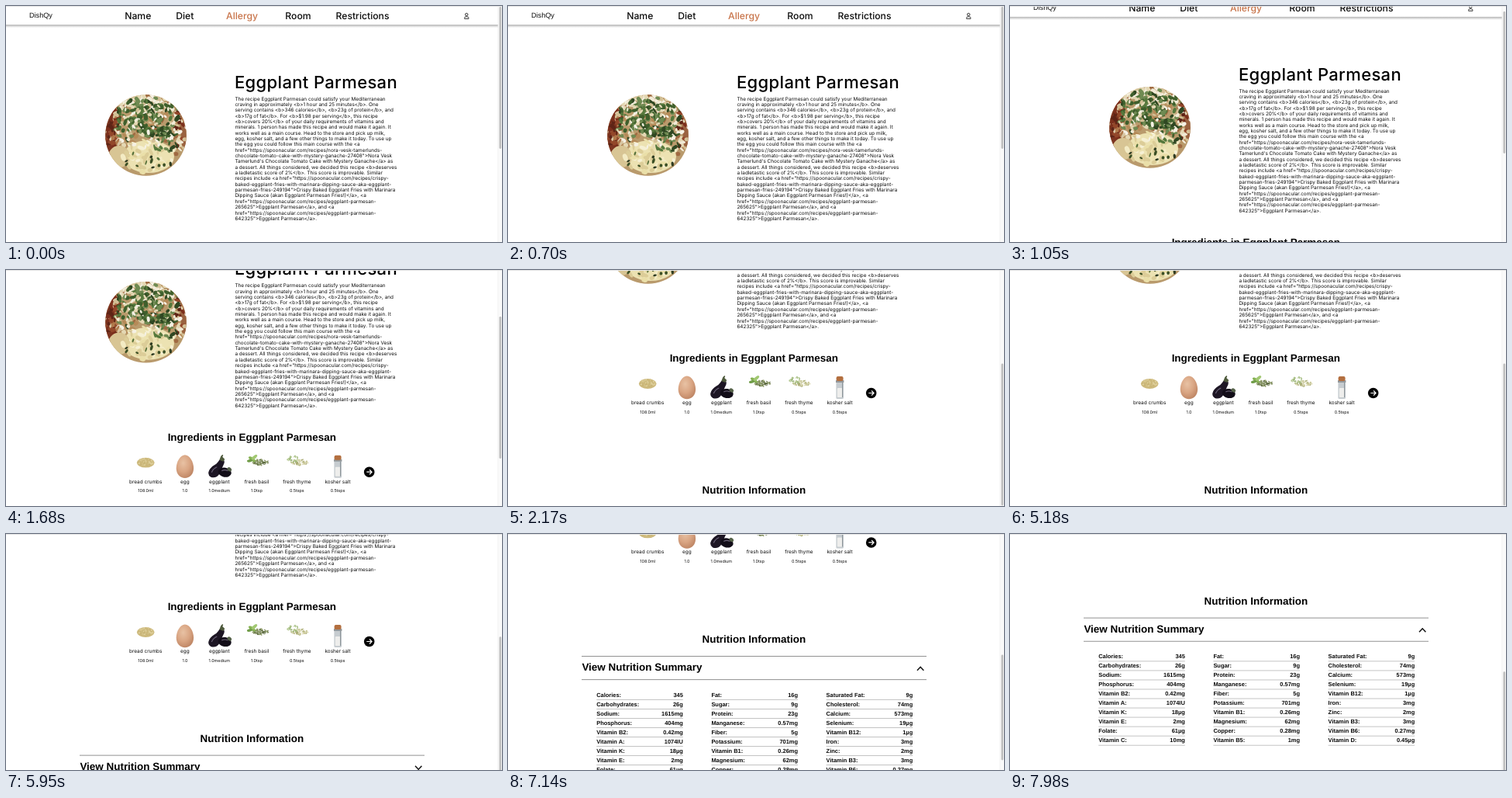
Recreate the animation shown at these times as an HTML page. Size 640 by 304 pixels, loop 8000 ms.

```html
<!DOCTYPE html>
<html lang="en">
<head>
<meta charset="utf-8">
<title>Recipe page</title>
<style>
html, body { margin: 0; width: 100%; height: 100%; overflow: hidden; background: #fff; }
svg { display: block; width: 640px; height: 304px; text-rendering: geometricPrecision; }
text { font-family: Inter, "Open Sans", sans-serif; fill: #0c0c0c; }
.title { font-size: 22px; font-weight: 500; letter-spacing: .35px; fill: #000; }
.nav { font-size: 12.2px; font-weight: 500; }
.bold { font: bold 13.45px "Liberation Sans", Arial, sans-serif; fill: #000; }
.cell { font: bold 7.45px "Liberation Sans", Arial, sans-serif; }
.logo { font: 9.1px "Liberation Sans", Arial, sans-serif; }
.mid { text-anchor: middle; }
.end { text-anchor: end; }
</style>
</head>
<body>
<svg id="stage" viewBox="0 0 640 304"></svg>
<script>
const LOOP = 8000;

let seed = 7;
const rnd = () => (seed = (seed * 16807) % 2147483647) / 2147483647;
const pick = list => list[Math.floor(rnd() * list.length)];
const range = (n, fn) => Array.from({ length: n }, (_, i) => fn(i)).join('');

const esc = s => s.replace(/&/g, '&amp;').replace(/</g, '&lt;');
const text = (x, y, s, cls = '', size = '', fill = '') =>
  `<text x="${x}" y="${y}" class="${cls}" style="${size && `font-size:${size}px;`}${fill && `fill:${fill}`}">${esc(s)}</text>`;
const oval = (x, y, rx, ry, fill, turn = 0) =>
  `<ellipse cx="${x}" cy="${y}" rx="${rx}" ry="${ry}" fill="${fill}" transform="rotate(${turn} ${x} ${y})"/>`;
const box = (x, y, w, h, fill, r = 0) =>
  `<rect x="${x}" y="${y}" width="${w}" height="${h}" rx="${r}" fill="${fill}"/>`;
const path = (d, fill, stroke = 'none', width = 1) =>
  `<path d="${d}" fill="${fill}" stroke="${stroke}" stroke-width="${width}"/>`;
const rule = (x, y, w, color) => box(x, y, w, 0.8, color);

// Small ovals scattered inside an ellipse
const scatter = (n, x, y, rx, ry, size, colors) => range(n, () => {
  const a = rnd() * 6.283, r = Math.sqrt(rnd());
  return oval(x + rx * r * Math.cos(a), y + ry * r * Math.sin(a),
    size * (0.6 + rnd() * 0.6), size * (0.3 + rnd() * 0.4), pick(colors), rnd() * 180);
});

const shades = `<defs><radialGradient id="shell" cx=".4" cy=".35" r=".7">
  <stop offset="0" stop-color="#e8c2a4"/><stop offset=".55" stop-color="#d9a583"/><stop offset="1" stop-color="#bd8463"/>
</radialGradient><linearGradient id="shadow" x2="0" y2="1">
  <stop offset="0" stop-color="#b4b4b4"/><stop offset="1" stop-color="#fff"/>
</linearGradient><clipPath id="plate"><circle cx="180.5" cy="166.5" r="52.3"/></clipPath></defs>`;

const header = () => {
  const nav = [['Name', 170.3], ['Diet', 230.8], ['Allergy', 304.5], ['Room', 377], ['Restrictions', 460]];
  return box(0, 24, 635, 4, 'url(#shadow)') +
    text(30, 15.4, 'DishQy', 'logo') +
    nav.map(([s, x]) => text(x, 17.1, s, 'nav mid', '', s === 'Allergy' ? '#c8744a' : '')).join('') +
    '<circle cx="594.3" cy="11" r="1.7" fill="none" stroke="#222" stroke-width=".9"/>' +
    path('M591.6 16.4v-.8q0-1.8 1.8-1.8h1.8q1.8 0 1.8 1.8v.8z', 'none', '#222', 0.9);
};

const dish = () => {
  const greens = ['#3f5f2c', '#56783c', '#2f4722', '#6f8a52'];
  const creams = ['#f1ead6', '#e4d8b4', '#f5f1e4', '#d3c096'];
  const crust = ['#7c2f1c', '#93472a', '#5e2416', '#b07a4c'];
  return '<g clip-path="url(#plate)">' + box(128, 114, 106, 106, '#b99a6c') +
    scatter(240, 181, 160, 52, 50, 4.5, [...creams, '#b58a58', '#a06a42']) +
    oval(133, 160, 10, 36, '#7c3420', 6) + oval(231, 158, 6, 30, '#9a6240', -4) +
    scatter(70, 139, 158, 9, 34, 4, [...crust, '#d8c6a2']) + scatter(30, 226, 158, 7, 34, 3.6, [...crust, ...creams]) +
    scatter(60, 176, 126, 38, 11, 4.2, creams) +
    oval(184, 194, 33, 21, '#ece2b2') + oval(146, 194, 14, 14, '#d8c594', 40) +
    scatter(50, 182, 194, 34, 22, 4.5, ['#f3ebc4', '#eadfa8', '#f6f0d4', '#dccd98']) +
    scatter(95, 188, 142, 36, 26, 4.2, greens) +
    scatter(40, 160, 150, 20, 28, 3.6, greens) + scatter(34, 206, 170, 20, 18, 3.8, greens) +
    scatter(50, 180, 150, 42, 32, 3, creams) +
    scatter(12, 182, 200, 36, 14, 3, ['#3b4f25', '#2f3c22', '#56703a']) + '</g>';
};

const summary = `The recipe Eggplant Parmesan could satisfy your Mediterranean
craving in approximately <b>1 hour and 25 minutes</b>. One
serving contains <b>346 calories</b>, <b>23g of protein</b>, and
<b>17g of fat</b>. For <b>$1.98 per serving</b>, this recipe
<b>covers 20%</b> of your daily requirements of vitamins and
minerals. 1 person has made this recipe and would make it again. It
works well as a main course. Head to the store and pick up milk,
egg, kosher salt, and a few other things to make it today. To use up
the egg you could follow this main course with the <a
href="https://spoonacular.com/recipes/nora-vesk-tamerlunds-
chocolate-tomato-cake-with-mystery-ganache-27408">Nora Vesk
Tamerlund's Chocolate Tomato Cake with Mystery Ganache</a> as
a dessert. All things considered, we decided this recipe <b>deserves
a ladletastic score of 2%</b>. This score is improvable. Similar
recipes include <a href="https://spoonacular.com/recipes/crispy-
baked-eggplant-fries-with-marinara-dipping-sauce-aka-eggplant-
parmesan-fries-249194">Crispy Baked Eggplant Fries with Marinara
Dipping Sauce (akan Eggplant Parmesan Fries!)</a>, <a
href="https://spoonacular.com/recipes/eggplant-parmesan-
265625">Eggplant Parmesan</a>, and <a
href="https://spoonacular.com/recipes/eggplant-parmesan-
642325">Eggplant Parmesan</a>.`;

const herbs = ['#6b7a48', '#93a06c', '#4f5d36'];
const grains = ['#d9c88f', '#c6b274', '#e4d7a8'];
const cheese = ['#f0dfae', '#e6cc8c', '#f6ecca'];

// Each item: name, amount, centre x, picture
const pages = [[
  ['bread crumbs', '108.0ml', 180.2, x => oval(x, 347.5, 11.3, 6.4, '#cdb97c') + scatter(60, x, 346.5, 10, 5, 1.1, grains)],
  ['egg', '1.0', 230.9, x =>
    path(`M${x} 337.5c6 0 11.2 9 11.2 17 0 8-5 12.700-11.2 12.700s-11.2-4.700-11.2-12.700c0-8 5.200-17 11.2-17z`, 'url(#shell)')],
  ['eggplant', '1.0medium', 275.3, x =>
    path(`M${x + 5} 343q3 3 0 8l-5 11q-4 6-11 4-5-3-2-9 3-5 9-8 3-3 4-5z`, '#1d1624') +
    oval(x + 7, 360, 8.5, 6, '#120d18', 10) + path(`M${x - 10} 360q2-5 7-7`, 'none', '#6b6278', 1.2) +
    path(`M${x + 3} 358q4-2 8 0`, 'none', '#6b6278', 1.2) +
    path(`M${x} 344l2-5 2-2 1 1-1 2 3 3-2 3z`, '#4e5a3c') + oval(x + 13, 356, 3, 2.4, '#56634a', 40)],
  ['fresh basil', '1.0tsp', 323.5, x => scatter(70, x + 5, 347, 10, 4, 1.3, herbs) +
    oval(x - 6, 343, 5.4, 2.2, '#86b254', 35) + oval(x - 3, 340.5, 4.5, 2, '#a2c873', -40) + oval(x - 9, 345, 3.6, 1.8, '#709c48', -10)],
  ['fresh thyme', '0.5tsps', 375.4, x => scatter(70, x + 3, 347, 11, 3.6, 1.3, ['#c9c795', '#a9ab73', '#dcd9b4']) +
    scatter(24, x - 5, 343, 8, 4, 1.5, ['#93b070', '#b9cc98'])],
  ['kosher salt', '0.5tsps', 428, x => box(x - 4.6, 345, 9.6, 22, '#c6ccd0', 1.5) + box(x - 3.2, 353, 6.8, 12, '#eeeeec', 1) +
    box(x - 5, 343, 10.4, 3, '#94999c') + box(x - 4.4, 338, 9, 6, '#b36f3f', 2) + box(x + 3, 346, 1.2, 19, '#8f979c')]
], [
  ['milk', '1.0Tbsp', 127.3, x => path(`M${x - 12.5} 339h25l-3 26q-9 4-19 0z`, '#e6e8ea') +
    path(`M${x - 11} 345h22l-2.6 19q-8 3-16.6 0z`, '#f8f8f6') + oval(x, 339, 12.5, 2.2, '#d9dcde') +
    oval(x, 339.2, 11, 1.5, '#f5f6f6') + oval(x, 345, 11, 2, '#fff') + path(`M${x - 9} 365q9 3 18 0`, 'none', '#c3c7ca')],
  ['fresh oregano', '1.0tsp', 178.3, x => oval(x + 2, 346.5, 10, 3.6, '#7c8a55') + scatter(55, x + 1, 346, 12, 4, 1.2, herbs) +
    oval(x - 9, 343, 4.5, 2.4, '#6f9f4c', 25) + oval(x - 4, 341, 4, 2, '#88b463', -25)],
  ['parmesan cheese', '150.0g', 244, x => path(`M${x - 3} 349l4-7 10 1 1 8-9 3z`, '#e5c98b') + path(`M${x - 3} 349l4-7 10 1-5 5z`, '#f3e1b3') +
    oval(x - 4, 352, 7.5, 3.6, '#eedcae') + scatter(30, x - 3, 352, 9, 3.4, 1.5, cheese)],
  ['italian seasoning mix', '1.5tsps', 320.3, x => `<g transform="rotate(38 ${x + 3} 349)">` +
    box(x - 3, 336, 13, 27, '#cfc9a9', 3) + box(x - 1, 343, 9, 15, '#e6e2cd') + box(x - 3, 335, 13, 5, '#b9b394', 2) + '</g>' +
    scatter(30, x + 4, 349, 6, 7, 1.2, ['#a59a66', '#dcd5b2', '#8a8352']) +
    scatter(45, x - 6, 362, 8, 3.6, 1.2, ['#cdbb7c', '#a9a15e', '#e2d8ac'])],
  ['shredded mozzarella cheese', '224.0g', 412.7, x => path(`M${x - 12.5} 349q3 9 12.5 9.5 9.5-.5 12.5-9.5z`, '#8f4a2b') +
    oval(x, 348, 12.6, 6, '#a4663e') + oval(x, 347.5, 11.5, 5.2, '#eee7cb') +
    scatter(45, x, 347.2, 10, 4, 1.4, ['#f8f4e2', '#e4dab4', '#efe8cf'])],
  ['tomato sauce', '735.0ml', 494.3, x => box(x - 7, 342, 14, 24.5, '#a52419', 3) + box(x - 5.5, 338.5, 11, 4, '#3c3431', 1) +
    box(x - 5, 346, 10, 13, '#bb3526', 1) + box(x + 4.5, 345, 1.5, 19, '#7a160f')]
]];

const arrow = (x, dir) => `<g transform="translate(${x} 359.5) scale(${dir} 1)"><circle r="6.8" fill="#000"/>` +
  path('M-3.4 0H3.2M.4-3L3.4 0 .4 3', 'none', '#fff', 1.2) + '</g>';

const carousel = (items, i) => `<g id="page${i}">` + items.map(([name, amount, x, draw]) =>
  draw(x) + text(x, 374, name, 'mid', 6.45) + text(x, 385.7, amount, 'mid', 5.4)).join('') +
  (i ? arrow(99.8, -1) : arrow(468.7, 1)) + '</g>';

const facts = [
  'Calories 345|Carbohydrates 26g|Sodium 1615mg|Phosphorus 404mg|Vitamin B2 0.42mg|Vitamin A 1074IU|Vitamin K 18µg|Vitamin E 2mg|Folate 61µg|Vitamin C 10mg',
  'Fat 16g|Sugar 9g|Protein 23g|Manganese 0.57mg|Fiber 5g|Potassium 701mg|Vitamin B1 0.26mg|Magnesium 62mg|Copper 0.28mg|Vitamin B5 1mg',
  'Saturated Fat 9g|Cholesterol 74mg|Calcium 573mg|Selenium 19µg|Vitamin B12 1µg|Iron 3mg|Zinc 2mg|Vitamin B3 3mg|Vitamin B6 0.27mg|Vitamin D 0.45µg'
];
const table = () => facts.map((column, c) => column.split('|').map((row, r) => {
  const cut = row.lastIndexOf(' '), x = 114.2 + c * 148.2, y = 558.2 + r * 12.03;
  return text(x, y, row.slice(0, cut) + ':', 'cell') + text(x + 111.6, y, row.slice(cut + 1), 'cell end') +
    rule(x, y + 3.3, 111.6, '#b5b5b5');
}).join('')).join('');

const stage = document.getElementById('stage');
stage.innerHTML = shades + '<g id="content">' + header() + dish() +
  text(295, 105.6, 'Eggplant Parmesan', 'title') +
  summary.split('\n').map((s, i) => text(295.4, 121.7 + i * 7.34, s, '', 6.4)).join('') +
  text(317.3, 319.2, 'Ingredients in Eggplant Parmesan', 'bold mid') +
  pages.map(carousel).join('') +
  text(317.3, 488.5, 'Nutrition Information', 'bold mid') +
  rule(95, 505.7, 445, '#777') + text(95.4, 524.8, 'View Nutrition Summary', 'bold') +
  '<g id="chevron">' + path('M-4.2-2.2L0 2.2 4.2-2.2', 'none', '#111', 1.5) + '</g>' +
  '<g id="open">' + rule(95, 535.8, 445, '#777') + table() + '</g></g>' +
  box(0, 0, 640, 1, '#e6e6e6') + box(635, 1, 5, 303, '#fafafa') + box(634.6, 1, 0.6, 303, '#e9e9e9') +
  '<rect id="thumb" x="636.4" width="2.8" rx="1.4" fill="#c0c0c0"/>';

const $ = id => document.getElementById(id);
const clamp = v => Math.min(1, Math.max(0, v));
const lerp = (a, b, k) => a + (b - a) * k;
const smooth = k => k * k * (3 - 2 * k);

// Scroll legs: start, end, distance, easing
const legs = [
  [770, 1050, 10, k => k * k],
  [1050, 1680, 89, k => k * (0.65 + 0.35 * k)],
  [1680, 2140, 102, k => k * (1.25 - 0.25 * k)],
  [5350, 5740, 20, smooth],
  [6750, 7350, 177, smooth]
];
const scrollAt = t => legs.reduce((sum, [a, b, d, ease]) => sum + d * ease(clamp((t - a) / (b - a))), 0);
const show = (id, on) => $(id).setAttribute('display', on ? 'inline' : 'none');

function draw() {
  const t = performance.now() % LOOP;
  const scroll = scrollAt(t);
  const open = smooth(clamp((t - 6600) / 220));
  const second = t >= 3500 && t < 4550;
  $('content').setAttribute('transform', `translate(0 ${-scroll})`);
  show('page0', !second);
  show('page1', second);
  show('open', open > 0);
  $('chevron').setAttribute('transform', `translate(532.2 522) rotate(${180 * open})`);
  $('thumb').setAttribute('y', 1 + scroll * lerp(0.594, 0.443, open));
  $('thumb').setAttribute('height', lerp(183, 136, open));
  requestAnimationFrame(draw);
}
draw();
</script>
</body>
</html>
```
